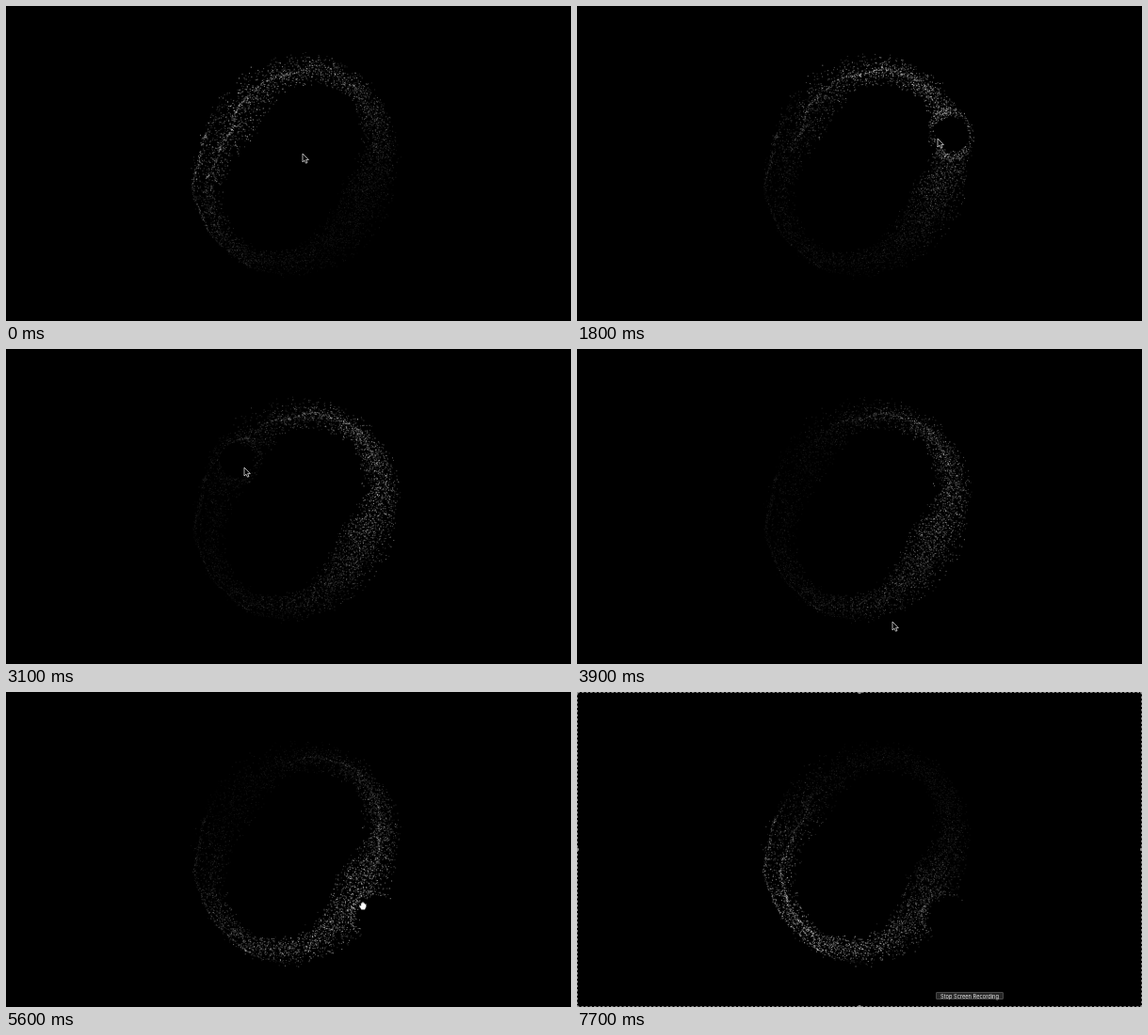
Animation of 600x335 px, one loop 7800 ms. Source, as an HTML page with a canvas:

```html
<!DOCTYPE html>
<html lang="en">
<head>
<meta charset="utf-8">
<title>Particle ring</title>
<style>
  html, body { margin: 0; width: 100%; height: 100%; overflow: hidden; background: #000; }
  canvas { display: block; }
  #tip {
    position: absolute; left: 381px; top: 319px; width: 72px; height: 8px;
    box-sizing: border-box; border: .5px solid #484848; border-radius: 1px;
    background: #262626; color: #eee; text-align: center; white-space: nowrap;
    font: 5.7px/7px Inter, "Open Sans", sans-serif;
  }
</style>
</head>
<body>
<canvas id="stage" width="600" height="335"></canvas>
<div id="tip" hidden>Stop Screen Recording</div>
<script>
const LOOP = 7800, STEP = 100, CX = 308, CY = 170, TAU = Math.PI * 2;
const ctx = document.getElementById('stage').getContext('2d');
const tip = document.getElementById('tip');

// Pointer: time, x, y
const POINTER = [
  [900, 315, 157], [1800, 383, 141], [2100, 424, 165], [3100, 253, 126],
  [3900, 335, 290], [4800, 379, 227], [6400, 379, 228], [6900, 415, 345]
];

// Bright threads at depth u of the ring, seen around a drifting angle
const THREADS = [
  { u: .93, mid: s => 2.75, from: -999, to: 9999 },
  { u: .52, mid: s => 3.75 + .31 * s, from: -999, to: 6600 },
  { u: .43, mid: s => 3, from: 6000, to: 9999 }
];

let seed = 7;
function rnd() {
  seed = (seed * 1664525 + 1013904223) >>> 0;
  return seed / 4294967296;
}
const spread = () => rnd() + rnd() - 1;
const clamp = v => Math.max(0, Math.min(1, v));
const smooth = v => v * v * (3 - 2 * v);

// Both edges are slanted ovals
const outer = a => 113 + 6 * Math.cos(2 * (a - 1.92));
const inner = a => 75 + 20 * Math.cos(2 * (a - 2.11)) + 3 * Math.cos(a - 2.4);

const dots = [];
function addDot(angle, u, sway, thread) {
  const r = inner(angle) + (outer(angle) - inner(angle)) * u;
  dots.push({
    angle, r, sway, thread, phase: rnd() * TAU, level: .25 + .75 * rnd() ** 2
  });
}

while (dots.length < 4500) {
  const a = rnd() * TAU;
  if (rnd() < .75 + .25 * Math.cos(a - .4)) addDot(a, .5 + spread() * .58, 2.2);
}
for (const thread of THREADS) {
  for (let i = 0; i < 850; i++) {
    const a = rnd() * TAU;
    const wave = .06 * Math.sin(5 * a) + .04 * Math.sin(13 * a + 1);
    addDot(a, thread.u + wave + spread() * .05, .6, thread);
  }
}

function threadFade({ mid, from, to }, angle, t) {
  const off = Math.acos(Math.cos(angle - mid(t / 1000)));
  return clamp((1.2 - off) * 2) * clamp((t - from) / 600) * clamp((to - t) / 600);
}

function pointerAt(t) {
  let i = 0;
  while (i < POINTER.length - 2 && POINTER[i + 1][0] <= t) i++;
  const [t0, x0, y0] = POINTER[i], [t1, x1, y1] = POINTER[i + 1];
  const f = smooth(clamp((t - t0) / (t1 - t0)));
  return [x0 + (x1 - x0) * f, y0 + (y1 - y0) * f];
}

function drawDots(t) {
  const s = t / 1000, light = -2.05 + s * .53;
  const gain = .4 + .2 * Math.abs(Math.sin(light));
  // The repelling spot lies a little further out than the pointer
  const [px, py] = pointerAt(Math.min(t, 6400));
  const hx = 300 + (px - 300) * 1.18, hy = 167 + (py - 167) * 1.18;
  const hole = 17, reach = 28;
  ctx.fillStyle = '#fff';
  for (const { angle, r, sway, thread, phase, level } of dots) {
    const fade = thread ? threadFade(thread, angle, t) : 1;
    if (!fade) continue;
    const radius = r + 1.3 * Math.sin(3 * angle + s * .5);
    let x = CX + radius * Math.cos(angle) + sway * Math.sin(phase + s * .45);
    let y = CY + radius * Math.sin(angle) + sway * Math.cos(phase * 3 + s * .4);
    const dx = x - hx, dy = y - hy, dist = Math.hypot(dx, dy) || 1;
    if (dist < reach) {
      const push = hole / dist + 1 - hole / reach;
      x = hx + dx * push;
      y = hy + dy * push;
    }
    const lit = ((1 + Math.cos(angle - light)) / 2) ** 1.5;
    ctx.globalAlpha = fade * level * (.1 + gain * lit);
    ctx.fillRect(x - .5, y - .5, 1, 1);
  }
  ctx.globalAlpha = 1;
}

const arrow = new Path2D('M0 0V9L2 7.2L3.5 10.2L5 9.5L3.6 6.6H6.4Z');
const hand = new Path2D('M-3.5 -1L-2 0V-3H-.8V-4H.8V-3H2V-2H3.5V1L2 4H-1.5L-3.8 .5Z');

function drawPointer(t) {
  const grab = t >= 5600 && t < 6500, shape = grab ? hand : arrow;
  ctx.save();
  ctx.translate(...pointerAt(t));
  ctx.fillStyle = grab ? '#fff' : '#000';
  ctx.strokeStyle = grab ? '#555' : '#ddd';
  ctx.lineWidth = grab ? .4 : .8;
  ctx.fill(shape);
  ctx.stroke(shape);
  ctx.restore();
}

function drawFrame() {
  ctx.strokeStyle = '#808080';
  ctx.lineWidth = 1;
  ctx.setLineDash([2.5, 2]);
  ctx.strokeRect(.5, .5, 599, 334);
  ctx.setLineDash([]);
  ctx.fillStyle = '#999';
  for (const x of [0, 300, 600]) for (const y of [0, 167.5, 335]) {
    if (x === 300 && y === 167.5) continue;
    ctx.beginPath();
    ctx.arc(x, y, 2, 0, TAU);
    ctx.fill();
  }
}

function render(now) {
  const t = Math.floor(now % LOOP / STEP) * STEP;
  ctx.fillStyle = '#000';
  ctx.fillRect(0, 0, 600, 335);
  drawDots(t);
  drawPointer(t);
  if (t >= 6900) drawFrame();
  tip.hidden = t < 7300;
  requestAnimationFrame(render);
}
requestAnimationFrame(render);
</script>
</body>
</html>
```
